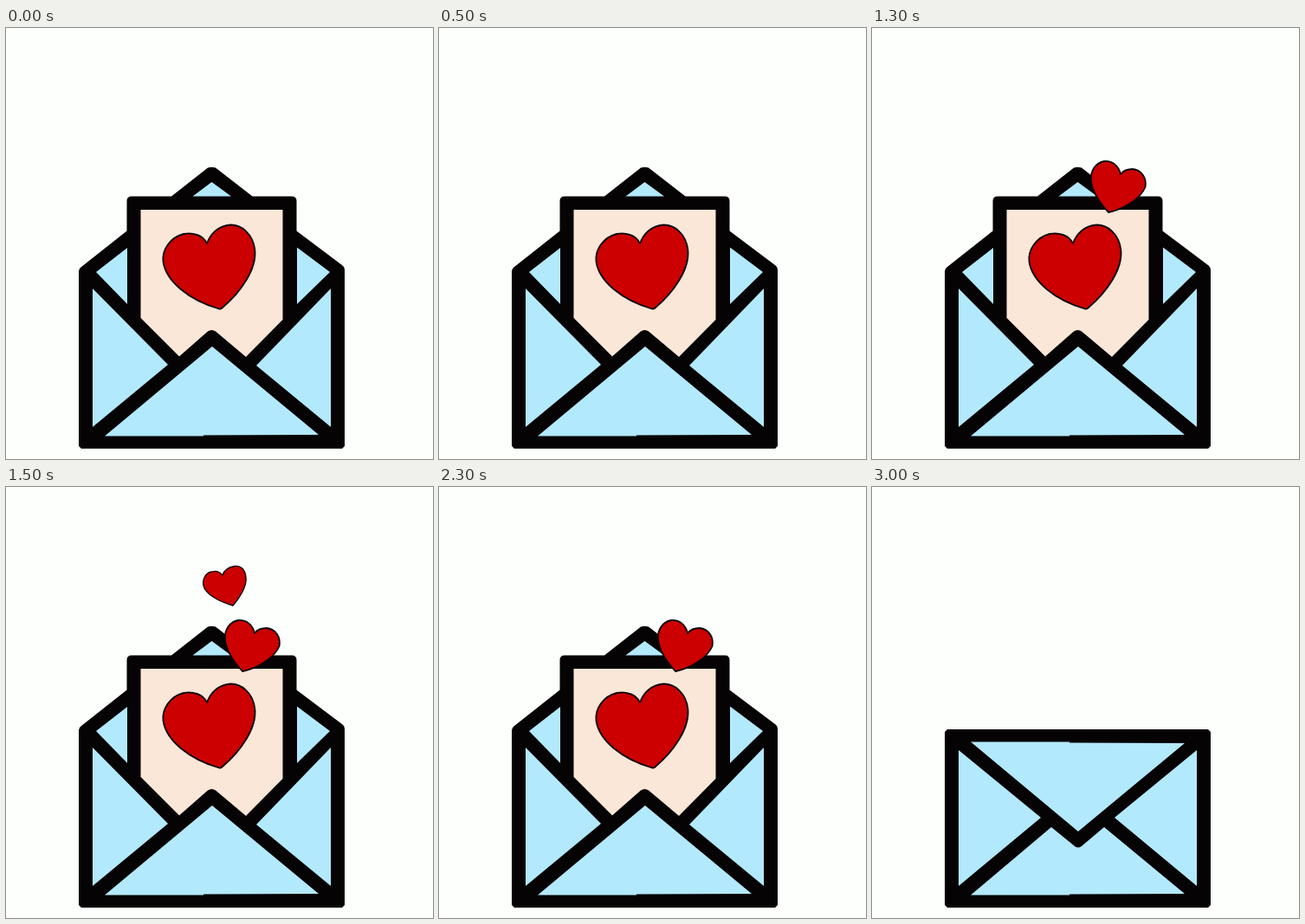
An HTML page that plays this animation: 493x498 px, repeating every 3500 ms.

```html
<!DOCTYPE html>
<html lang="en">
<head>
<meta charset="utf-8">
<title>Love letter</title>
<style>
  html, body { margin: 0; width: 100%; height: 100%; overflow: hidden; background: #fdfffc; }
  svg { display: block; width: 100%; height: 100%; }
  .ink { fill: #050304; }
  .sky { fill: #b3e9fd; }
  .paper { fill: #fbe7d7; }
  .heart { fill: #cc0000; stroke: #0a0203; stroke-width: 1.8; stroke-linejoin: round; }
  #small { stroke-width: 1.3; }
</style>
</head>
<body>
<svg viewBox="0 0 493 498" preserveAspectRatio="none">
  <g id="open">
    <path class="ink" d="M84 281Q84 278 87 276L139.500 234.500V200Q139.500 194.500 145 194.500H191L233 161.500Q237.500 160 242 161.500L284.500 194.500H330Q335.500 194.500 335.500 200V234.500L388 274Q391 276 391 280V483L388 486H87L84 483Z"/>
    <path class="sky" d="M215.500 194.500L237.500 178L260 194.500ZM104 282L140 254V319ZM336 253.500L374 282L336 319ZM100 301L187 389L100 461ZM375 301V461L289 390ZM114 471.500L238 368L361 470L228 470.500V471.500Z"/>
    <path class="paper" d="M155.500 210H319.500V337L277 380L242 350.500Q237.500 347.500 233 350.500L200 379.500L155.500 335Z"/>
    <path class="heart" d="M232 249C228 240 216 235.500 205 238C189 242 180 257 181.500 270C185 293 211 314 246 324.500C248 325 249 324.500 250 323C270 306 290 279 287.300 256C285 238 272 227 259 227.500C245 228.500 236 238 232 249Z"/>
  </g>
  <path id="mid" class="heart" d="M287 169C285 159 277 153 268 154C258 156 252 165 253 176C254 190 264 203 273 213C288 210 309 199 315.500 184C317.500 173 311 164 301 163C295 163 290 165 287 169Z"/>
  <path id="small" class="heart" d="M250 102C247 98 242 96.500 237 98C230 99.500 226.500 107 228 114C230.500 124 246 132.500 262 137C269 129 278.500 115 277 104C276 95 271 90.500 264 91.500C257 92.500 252 96 250 102Z"/>
  <g id="closed">
    <path class="ink" d="M87 280H388L391 283V483L388 486H87L84 483V283Z"/>
    <path class="sky" d="M114 294.500H228V295.500L361 296L238 398ZM100 304L195 382L100 461ZM375 304V461L280 382ZM114 471.500L207 393L234 415Q238 418 242 415L268 393L361 470L228 470.500V471.500Z"/>
  </g>
</svg>
<script>
  const LOOP = 3500;

  // id: [shown from, hidden at] in ms
  const shown = {
    open: [0, 3000],
    mid: [1000, 2500],
    small: [1500, 2000],
    closed: [3000, LOOP]
  };

  const parts = Object.entries(shown).map(([id, span]) => [document.getElementById(id), ...span]);
  const start = performance.now();

  function draw(now) {
    const t = Math.max(0, now - start) % LOOP;
    for (const [el, from, to] of parts) {
      el.style.visibility = t >= from && t < to ? "visible" : "hidden";
    }
    requestAnimationFrame(draw);
  }
  draw(start);
</script>
</body>
</html>
```
